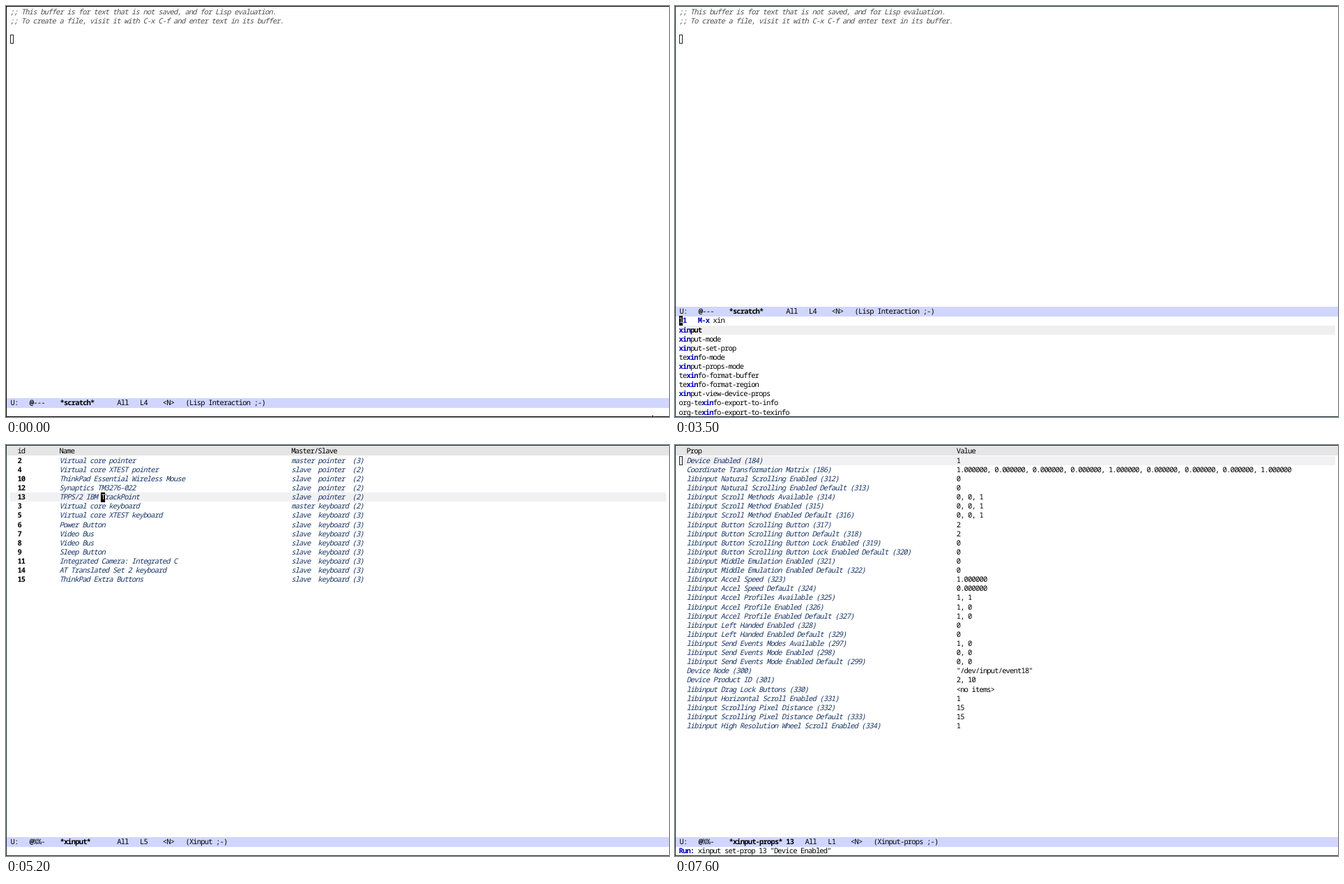
An HTML page for the animation above (8000 ms loop, 951x589 px).

```html
<!DOCTYPE html>
<html lang="en">
<head>
<meta charset="utf-8">
<title>Emacs xinput session</title>
<style>
  html, body { margin: 0; width: 100%; height: 100%; overflow: hidden; background: #fff; }
  #stage {
    position: relative; width: 951px; height: 589px; overflow: hidden; background: #fff; color: #000;
    font: 10.5px/13.11px "Noto Sans Mono", "DejaVu Sans Mono", monospace;
    letter-spacing: -0.845px; text-rendering: geometricPrecision;
  }
  #stage > * { position: absolute; }
  .text { white-space: pre; margin-top: 1px; }
  .bar { left: 1px; right: 0; height: 14px; }
  .band { left: 5.5px; width: 941.5px; height: 13.11px; }
  .comment { font-style: italic; color: #505050; }
  .name { font-style: italic; color: #193668; }
  .blue { color: #0000c0; font-weight: 600; }
  .fill, .hollow { box-sizing: border-box; width: 5.5px; height: 13.3px; }
  .fill { background: #000; color: #fff; white-space: pre; line-height: 15.1px; }
  .hollow { border: 1px solid #222; }
  .frame { inset: 0; box-sizing: border-box; border: solid; border-width: 1px 0 1px 1px; }
  b { font-weight: 600; }
</style>
</head>
<body>
<div id="stage"></div>
<script>
const LOOP = 8000, CELL = 5.455, LINE = 13.11, LEFT = 5.5;
const MODE_TOP = 561.5, ECHO_TOP = 575.3, LIST_TOP = 15.8;
const stage = document.getElementById('stage');

const escape = s => s.replace(/&/g, '&amp;').replace(/</g, '&lt;');
const text = (col, top, html, cls = '', left = LEFT) =>
  `<div class="text ${cls}" style="left:${left + col * CELL}px;top:${top}px">${html}</div>`;
const bar = (top, color) => `<div class="bar" style="top:${top}px;background:${color}"></div>`;
const band = (top, color) => `<div class="band" style="top:${top}px;background:${color}"></div>`;
const caret = (kind, col, top, char = '') => kind
  ? `<div class="${kind}" style="left:${LEFT + col * CELL}px;top:${top}px">${kind === 'fill' ? char : ''}</div>` : '';

const scratch = [
  ';; This buffer is for text that is not saved, and for Lisp evaluation.',
  ';; To create a file, visit it with C-x C-f and enter text in its buffer.'
];

const pointers = ['2 Virtual core pointer', '4 Virtual core XTEST pointer',
  '10 ThinkPad Essential Wireless Mouse', '12 Synaptics TM3276-022', '13 TPPS/2 IBM TrackPoint'];
const keyboards = ['3 Virtual core keyboard', '5 Virtual core XTEST keyboard', '6 Power Button',
  '7 Video Bus', '8 Video Bus', '9 Sleep Button', '11 Integrated Camera: Integrated C',
  '14 AT Translated Set 2 keyboard', '15 ThinkPad Extra Buttons'];
const device = (kind, master, slave) => (entry, i) => {
  const [, id, name] = entry.match(/^(\d+) (.*)/);
  return { id, name, role: `${i ? 'slave ' : 'master'} ${kind.padEnd(8)} (${i ? slave : master})` };
};
const devices = [...pointers.map(device('pointer', 3, 2)), ...keyboards.map(device('keyboard', 2, 3))];

const props = `Device Enabled (184)|1
Coordinate Transformation Matrix (186)|1.000000, 0.000000, 0.000000, 0.000000, 1.000000, 0.000000, 0.000000, 0.000000, 1.000000
libinput Natural Scrolling Enabled (312)|0
libinput Natural Scrolling Enabled Default (313)|0
libinput Scroll Methods Available (314)|0, 0, 1
libinput Scroll Method Enabled (315)|0, 0, 1
libinput Scroll Method Enabled Default (316)|0, 0, 1
libinput Button Scrolling Button (317)|2
libinput Button Scrolling Button Default (318)|2
libinput Button Scrolling Button Lock Enabled (319)|0
libinput Button Scrolling Button Lock Enabled Default (320)|0
libinput Middle Emulation Enabled (321)|0
libinput Middle Emulation Enabled Default (322)|0
libinput Accel Speed (323)|1.000000
libinput Accel Speed Default (324)|0.000000
libinput Accel Profiles Available (325)|1, 1
libinput Accel Profile Enabled (326)|1, 0
libinput Accel Profile Enabled Default (327)|1, 0
libinput Left Handed Enabled (328)|0
libinput Left Handed Enabled Default (329)|0
libinput Send Events Modes Available (297)|1, 0
libinput Send Events Mode Enabled (298)|0, 0
libinput Send Events Mode Enabled Default (299)|0, 0
Device Node (300)|"/dev/input/event18"
Device Product ID (301)|2, 10
libinput Drag Lock Buttons (330)|<no items>
libinput Horizontal Scroll Enabled (331)|1
libinput Scrolling Pixel Distance (332)|15
libinput Scrolling Pixel Distance Default (333)|15
libinput High Resolution Wheel Scroll Enabled (334)|1`.split('\n').map(line => line.split('|'));

const completions = {
  '': [9395, 'xinput eval-buffer recentf-mode kill-emacs daemons-restart unload-feature xinput-mode docker-images docker emacs-lisp-mode'],
  x: [1042, 'xinput xinput-mode text-mode next-line next-error hexl-mode xref-go-back exit-minibuffer next-buffer xinput-set-prop'],
  xi: [38, 'xinput xinput-mode exit-minibuffer xinput-set-prop texinfo-mode xinput-props-mode exit-recursive-edit texinfo-format-buffer texinfo-format-region xinput-view-device-props'],
  xin: [11, 'xinput xinput-mode xinput-set-prop texinfo-mode xinput-props-mode texinfo-format-buffer texinfo-format-region xinput-view-device-props org-texinfo-export-to-info org-texinfo-export-to-texinfo']
};

function modeLine(top, flags, buffer, width, line, mode) {
  const name = `<b>${buffer}</b>` + ' '.repeat(width - buffer.length);
  return bar(top, '#d0d6ff') + text(0, top + 0.7,
    `U:   <b>${flags[0]}</b>${flags.slice(1)}    ${name}All   L${line}    &lt;N>   (${mode} ;-)`, '', 6.5);
}

function completionList(query, atStart) {
  const top = 444.4, [count, names] = completions[query];
  const label = String(count).padEnd(5);
  const rows = names.split(' ').map((name, i) => {
    const marked = query ? name.replace(query, `<span class="blue">${query}</span>`) : name;
    return text(0, top + LINE * (i + 1), i ? marked : `<b>${marked}</b>`);
  });
  return band(top + LINE, '#efefef') + rows.join('') +
    text(0, top, `<span class="blue">${label}M-x</span> ${query}`) +
    caret('fill', atStart ? 0 : 9 + query.length, top, atStart ? label[0] : '');
}

function header(...columns) {
  return bar(1, '#e5e5e5') + columns.map(([col, label]) => text(col, 2.4, label)).join('');
}

const scenes = {
  scratch(s) {
    const open = s.query !== null;
    return scratch.map((line, i) => text(0, 1.5 + i * LINE, line, 'comment')).join('') +
      caret(s.cursor, 0, 40.5) +
      modeLine(open ? 430.5 : MODE_TOP, '@---', '*scratch*', 15, 4, 'Lisp Interaction') +
      (open ? completionList(s.query, s.atStart) : '');
  },
  devices(s) {
    const rows = devices.map(({ id, name, role }, i) => {
      const top = LIST_TOP + i * LINE;
      return text(2, top, `<b>${id}</b>`) + text(13, top, name, 'name') + text(74, top, role, 'name');
    });
    const char = s.col ? devices[s.row].name[s.col - 13] : '';
    return header([2, 'id'], [13, 'Name'], [74, 'Master/Slave']) +
      band(LIST_TOP + s.row * LINE, '#f1f0f3') +
      (s.pulse ? band(LIST_TOP + 4 * LINE, s.pulse) : '') + rows.join('') +
      caret(s.cursor, s.col, LIST_TOP + s.row * LINE, char) +
      modeLine(MODE_TOP, '@%%-', '*xinput*', 15, s.row + 1, 'Xinput') + text(0, ECHO_TOP, s.echo);
  },
  props(s) {
    const rows = props.map(([name, value], i) =>
      text(2, LIST_TOP + i * LINE, name, 'name') + text(73, LIST_TOP + i * LINE, escape(value)));
    const prompt = '<span class="blue">Run:</span> xinput set-prop 13 "Device Enabled" ';
    return header([2, 'Prop'], [73, 'Value']) + band(LIST_TOP + s.row * LINE, '#f1f0f3') + rows.join('') +
      caret(s.cursor, 0, LIST_TOP + s.row * LINE) +
      modeLine(MODE_TOP, '@%%-', '*xinput-props* 13', 20, s.row + 1, 'Xinput-props') +
      (s.prompt ? text(0, ECHO_TOP, prompt) : '') +
      (s.promptCol ? caret('fill', s.promptCol, ECHO_TOP, s.promptCol === 5 ? 'x' : '') : '');
  }
};

function arrow([x, y]) {
  return `<svg style="left:${x}px;top:${y}px" width="10" height="14" overflow="visible">
    <path d="M0 0V9.4L2.2 7.4L3.6 10.8L5 10.2L3.6 6.9H6.4Z" fill="#000" stroke="#fff" stroke-width=".7" paint-order="stroke"/></svg>`;
}

// Each step changes part of the state from its time (ms) on.
const steps = [
  [0, { scene: 'scratch', border: '#000', cursor: 'hollow', pointer: [927, 586], query: null, row: 0, col: 0, echo: '' }],
  [100, { pointer: [742, 541] }],
  [200, { pointer: [630, 500] }],
  [1800, { pointer: [618.5, 472] }],
  [1900, { pointer: [614, 460.5] }],
  [2000, { border: '#17303c', cursor: 'fill' }],
  [2700, { query: '', cursor: 'hollow' }],
  [3000, { query: 'x', pointer: null }],
  [3100, { query: 'xi' }],
  [3200, { query: 'xin' }],
  [3500, { atStart: true }],
  [3600, { scene: 'devices', cursor: 'fill' }],
  [3800, { pulse: '#efeff1' }],
  [4000, { pulse: '#f6f6f8' }],
  [4100, { pulse: null }],
  [4600, { row: 3, col: 24 }],
  [4700, { row: 0, col: 0, echo: 'Beginning of buffer' }],
  [4900, { row: 1, col: 24, echo: '' }],
  [5100, { row: 3 }],
  [5200, { row: 4 }],
  [5500, { scene: 'props', row: 0, col: 0 }],
  [6000, { cursor: null }],
  [6200, { cursor: 'fill', row: 1 }],
  [6600, { row: 0 }],
  [7100, { cursor: 'hollow', prompt: true, promptCol: 41 }],
  [7500, { promptCol: 5 }],
  [7600, { promptCol: null }]
];

let shown = -1;
function draw() {
  const time = performance.now() % LOOP;
  const current = steps.filter(([start]) => start <= time).length;
  if (current !== shown) {
    shown = current;
    const state = Object.assign({}, ...steps.slice(0, current).map(([, change]) => change));
    stage.innerHTML = scenes[state.scene](state) +
      `<div class="frame" style="border-color:${state.border}"></div>` +
      (state.pointer ? arrow(state.pointer) : '');
  }
  requestAnimationFrame(draw);
}
draw();
</script>
</body>
</html>
```
